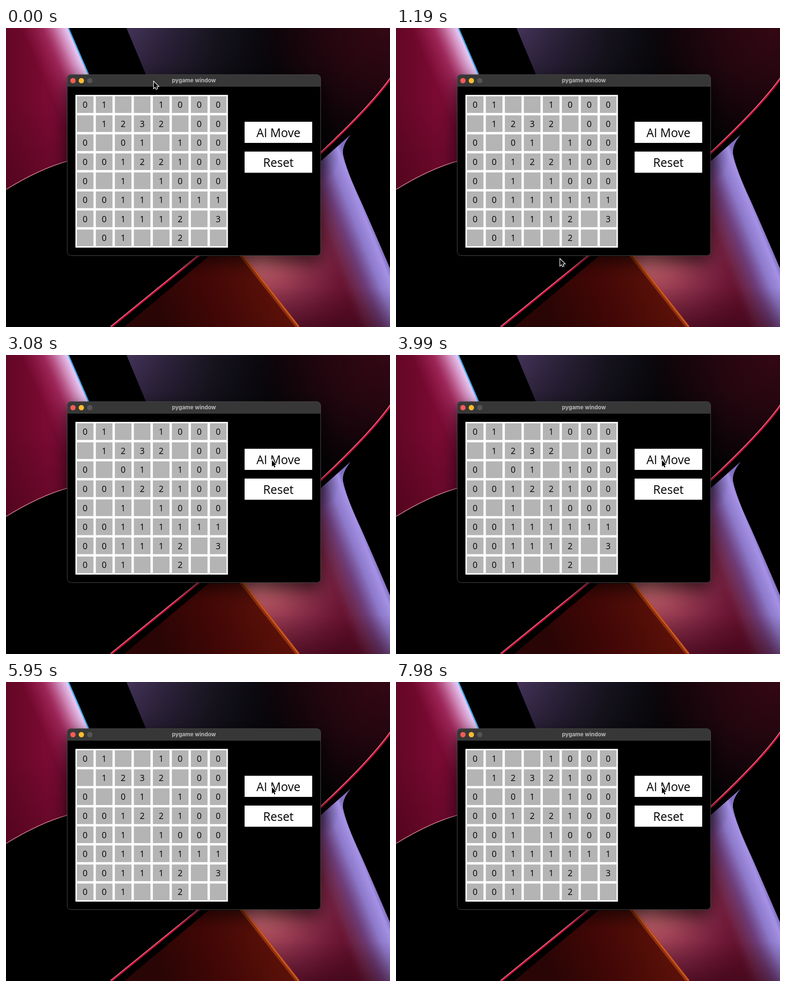
An HTML page with a canvas that plays this animation: 800 by 622 pixels, repeating every 8000 ms.

```html
<!DOCTYPE html>
<html lang="en">
<head>
<meta charset="utf-8">
<title>Minesweeper AI</title>
<style>
html, body { margin: 0; width: 800px; height: 622px; overflow: hidden; background: #000; }
canvas { display: block; }
</style>
</head>
<body>
<canvas id="stage" width="800" height="622"></canvas>
<script>
const LOOP = 8000, STEP = 70, SCALE = 0.88;
const stage = document.getElementById('stage');
const backdrop = document.createElement('canvas');
backdrop.width = 800;
backdrop.height = 622;
let ctx = backdrop.getContext('2d');

const rows = ['01..1000', '.1232.00', '0.01.100', '00122100',
              '0.1.1000', '00111111', '001112.3', '.01..2..'];
// time, row, column, digit
const reveals = [[2520, 7, 0, '0'], [4690, 4, 1, '0'], [6860, 1, 5, '1']];
const clicks = [2310, 4480, 6650];
// time, x, y of the pointer tip
const pointerPath = [[0, 308, 112], [1190, 342, 481], [2310, 549.7, 207], [2520, 554, 219]];

const clamp = v => Math.max(0, Math.min(1, v));
const smooth = v => v * v * (3 - 2 * v);

function addStops(gradient, stops) {
  stops.forEach(([at, color]) => gradient.addColorStop(at, color));
  return gradient;
}
const linear = (x0, y0, x1, y1, ...stops) =>
  addStops(ctx.createLinearGradient(x0, y0, x1, y1), stops);
const radial = (x, y, r, ...stops) =>
  addStops(ctx.createRadialGradient(x, y, 0, x, y, r), stops);

function paint(path, ...fills) {
  for (const fill of fills) {
    ctx.fillStyle = fill;
    ctx.fill(path);
  }
}

function line(d, color, width) {
  ctx.strokeStyle = color;
  ctx.lineWidth = width;
  ctx.stroke(new Path2D(d));
}

function disc(x, y, r, color) {
  ctx.fillStyle = color;
  ctx.beginPath();
  ctx.arc(x, y, r, 0, 7);
  ctx.fill();
}

function drawWallpaper() {
  ctx.fillStyle = '#000';
  ctx.fillRect(0, 0, 800, 622);

  // violet sheet and dark red corner at the top
  const sheet = new Path2D('M251 0H800V107C768 152 712 208 656 260L360 260Z');
  paint(sheet,
    linear(255, 40, 560, 0, [0, '#443359'], [0.25, '#2f253f'], [0.6, '#17141f'], [1, '#060508']),
    linear(400, 0, 400, 160, [0, '#0000'], [1, '#0008']),
    radial(790, -10, 270, [0, '#340814'], [0.45, '#24060f'], [1, '#24060f00']));

  // magenta panel on the left
  const panel = new Path2D('M0 0H130L172 97V262L128 277Q70 293 0 336Z');
  paint(panel,
    linear(0, 0, 172, 0, [0, '#640726'], [0.5, '#7b0a32'], [1, '#7a0c3a']),
    linear(67, 82, 150, 46, [0, '#a8285c00'], [0.45, '#b0386ea0'], [0.75, '#cc80b0'], [0.95, '#e4c4f0'], [1, '#c8c8ff']),
    linear(0, 150, 0, 330, [0, '#30001000'], [1, '#30001050']));
  line('M130 0L172 97', '#42a4e2', 2.6);
  line('M0 336Q70 293 128 277', '#d8808f', 1.3);

  // deep red wedge at the bottom
  const wedge = new Path2D('M422 475L246 622H608L492 475Z');
  paint(wedge, linear(320, 590, 530, 500, [0, '#2a0505'], [0.5, '#420706'], [1, '#581008']));

  // rose and lavender fold on the right
  const fold = new Path2D('M490 472L656 277L718 222Q700 244 702 262Q708 294 740 362Q768 425 800 500V622H608Z');
  paint(fold, '#5e0e2a',
    radial(530, 468, 220, [0, '#cc7074'], [0.3, '#b05060d8'], [0.65, '#8c305090'], [1, '#7a1c3c00']),
    linear(751, 378, 650, 418, [0, '#8070c0'], [0.08, '#a592e6'], [0.3, '#8c78c8'], [0.55, '#70488cd0'], [0.8, '#74386080'], [1, '#70183800']),
    radial(640, 270, 55, [0, '#1c0c2890'], [1, '#1c0c2800']),
    linear(0, 540, 0, 640, [0, '#20000800'], [1, '#20000870']));
  line('M490 472L608 622', '#90300e', 8);
  line('M493 472L610 622', '#cc5a22', 3);

  // glowing ribbon
  const ribbon = 'M802 104C768 152 712 208 656 260L400 475L219 622';
  line(ribbon, '#c80c34', 4.2);
  ctx.translate(-1.2, -1);
  line(ribbon, '#ec8c9a', 1.3);
  ctx.translate(1.2, 1);
}

function drawWindow() {
  const frame = new Path2D();
  frame.roundRect(127.5, 97, 528, 376.5, 8);
  ctx.save();
  ctx.shadowColor = 'rgba(0,0,0,.65)';
  ctx.shadowBlur = 36;
  ctx.shadowOffsetY = 14;
  paint(frame, '#000');
  ctx.restore();

  ctx.save();
  ctx.clip(frame);
  ctx.fillStyle = '#373737';
  ctx.fillRect(127, 97, 529, 25);
  ctx.restore();
  ctx.strokeStyle = '#484848';
  ctx.lineWidth = 1;
  ctx.stroke(frame);

  disc(139.5, 109.5, 5.5, '#f45c57');
  disc(157, 109.5, 5.5, '#fdbc2e');
  disc(174.5, 109.5, 5.5, '#555');
  ctx.textAlign = 'center';
  ctx.fillStyle = '#b8b8b8';
  ctx.font = '700 11.5px Inter, sans-serif';
  ctx.fillText('pygame window', 391.5, 113);
}

// Text centred the way a rendered line box is
function label(text, x, y, size) {
  ctx.fillStyle = '#000';
  ctx.font = `${size}px "Open Sans", sans-serif`;
  ctx.textAlign = 'center';
  ctx.fillText(text, x, y + 0.388 * size);
}

function inGame(draw) {
  ctx.save();
  ctx.translate(127.5, 122);
  ctx.scale(SCALE, SCALE);
  draw();
  ctx.restore();
}

const cellLabel = (digit, row, col) => label(digit, 42.5 + col * 45, 42.5 + row * 45, 20);

function drawGame() {
  ctx.fillStyle = '#fff';
  ctx.fillRect(19.5, 19.5, 361, 361);
  rows.forEach((cells, row) => [...cells].forEach((digit, col) => {
    ctx.fillStyle = '#b4b4b4';
    ctx.fillRect(22.8 + col * 45, 22.8 + row * 45, 39.4, 39.4);
    if (digit !== '.') cellLabel(digit, row, col);
  }));
  [['AI Move', 83], ['Reset', 153.5]].forEach(([text, y]) => {
    ctx.fillStyle = '#fff';
    ctx.fillRect(420, y, 160, 50);
    label(text, 500, y + 25, 28);
  });
}

function pointerAt(t) {
  const next = pointerPath.findIndex(p => p[0] > t);
  if (next < 0) return pointerPath.at(-1).slice(1);
  const [t0, x0, y0] = pointerPath[next - 1];
  const [t1, x1, y1] = pointerPath[next];
  const k = smooth((t - t0) / (t1 - t0));
  return [x0 + (x1 - x0) * k, y0 + (y1 - y0) * k];
}

function drawRing(age, x, y) {
  if (age < 0 || age > 280) return;
  const grow = clamp(age / 70);
  ctx.globalAlpha = (0.12 + 0.78 * grow) * clamp((280 - age) / 140);
  ctx.strokeStyle = grow < 1 ? '#999' : '#6f93d6';
  ctx.lineWidth = 1 + 1.5 * grow;
  ctx.beginPath();
  ctx.arc(x - 1.5, y, 14 + 6 * grow, 0, 7);
  ctx.stroke();
  ctx.globalAlpha = 1;
}

const arrow = new Path2D('M0 0V13L3 10.4L5 15L7.2 14L5.2 9.5L9.3 9.2Z');

function drawPointer(x, y) {
  ctx.save();
  ctx.translate(x, y);
  ctx.lineWidth = 2.4;
  ctx.strokeStyle = '#fff';
  ctx.stroke(arrow);
  paint(arrow, '#000');
  ctx.restore();
}

drawWallpaper();
drawWindow();
inGame(drawGame);
ctx = stage.getContext('2d');

const start = performance.now();
function frame() {
  const elapsed = (performance.now() - start) % LOOP;
  const t = Math.floor(elapsed / STEP) * STEP;
  const [x, y] = pointerAt(t);
  ctx.drawImage(backdrop, 0, 0);
  inGame(() => reveals.forEach(([at, row, col, digit]) => {
    if (t >= at) cellLabel(digit, row, col);
  }));
  clicks.forEach(at => drawRing(t - at, x, y));
  drawPointer(x, y);
  requestAnimationFrame(frame);
}
frame();
</script>
</body>
</html>
```
